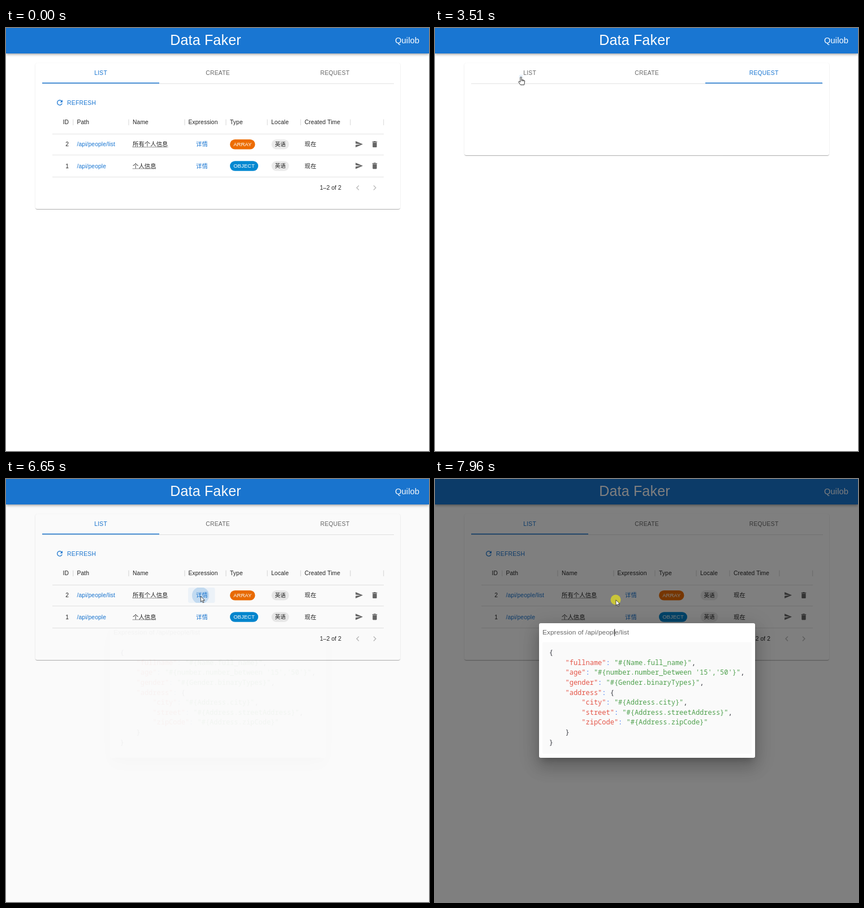
Recreate the animation shown at these times as an HTML page. Size 748 px wide and 748 px high, loop 8000 ms.

```html
<!DOCTYPE html>
<html lang="zh-CN">
<head>
<meta charset="utf-8">
<title>Data Faker</title>
<style>
html, body { margin: 0; width: 100%; height: 100%; overflow: hidden; background: #fff; }
div, body > svg { position: absolute; }
body > svg { left: 0; top: 0; width: 748px; height: 748px; }
svg { overflow: hidden; }
text { font-family: "Liberation Sans", "Noto Sans CJK SC", "Noto Sans CJK", sans-serif; white-space: pre; }
.code text { font: 12px "Noto Sans Mono", monospace; }
#head { left: 0; top: 0; width: 748px; height: 45px; background: #1976d2;
  box-shadow: 0 1.5px 3px -.7px #0003, 0 3px 3.7px #00000024, 0 .7px 7.4px #0000001f; }
#card { left: 52px; top: 62px; width: 645px; border-radius: 3px; background: #fff;
  box-shadow: 0 1.5px .7px -.7px #0003, 0 .7px .7px #00000024, 0 .7px 2.2px #0000001f; }
#shade { inset: 0; background: #00000080; }
#dialog { left: 183.5px; top: 255px; width: 382px; height: 237.5px; border-radius: 3px; background: #fff;
  box-shadow: 0 8px 11px -5px #0003, 0 17.6px 28px 2.2px #00000024, 0 6.6px 34px 6px #0000001f; }
#dialog svg { position: absolute; left: 0; top: 0; width: 100%; height: 100%; }
</style>
</head>
<body>
<div id="head"></div>
<div id="card"></div>
<svg id="page"></svg>
<div id="shade"></div>
<div id="dialog"></div>
<svg id="pointer"></svg>
<script>
const BLUE = '#1976d2', DARK = '#000000de', GREY = '#0009', RULE = '#e0e0e0';
const $ = id => document.getElementById(id);

// ---- drawing helpers ----
const text = (x, y, str, { size = 10.3, fill = DARK, gap = .11, anchor = 'start', id = '' } = {}) =>
  `<text ${id && `id="${id}"`} x="${x}" y="${y}" font-size="${size}" fill="${fill}" letter-spacing="${gap}" text-anchor="${anchor}">${str}</text>`;
const rect = (x, y, w, h, fill, r = 0, more = '') =>
  `<rect x="${x}" y="${y}" width="${w}" height="${h}" rx="${r}" fill="${fill}" ${more}/>`;
const hline = (x, y, w, fill) => rect(x, y, w, .9, fill);
const icon = (cx, cy, size, fill, d) =>
  `<path transform="translate(${cx - size / 2} ${cy - size / 2}) scale(${size / 24})" fill="${fill}" d="${d}"/>`;
const caret = (id, x, y, h) => rect(x, y, 1, h, '#222', 0, `id="${id}"`);

const ICON = {
  refresh: 'M17.65 6.35C16.2 4.9 14.21 4 12 4c-4.42 0-7.99 3.58-7.99 8s3.57 8 7.99 8c3.73 0 6.84-2.55 7.73-6h-2.08c-.82 2.33-3.04 4-5.65 4-3.31 0-6-2.69-6-6s2.69-6 6-6c1.66 0 3.14.69 4.22 1.78L13 11h7V4z',
  send: 'M2.01 21L23 12 2.01 3 2 10l15 2-15 2z',
  trash: 'M6 19c0 1.1.9 2 2 2h8c1.1 0 2-.9 2-2V7H6zM19 4h-3.5l-1-1h-5l-1 1H5v2h14z',
  prev: 'M15.41 7.41 14 6l-6 6 6 6 1.41-1.41L10.83 12z',
  next: 'M10 6 8.59 7.41 13.17 12l-4.58 4.59L10 18l6-6z',
  help: 'M11 18h2v-2h-2zm1-16C6.48 2 2 6.48 2 12s4.48 10 10 10 10-4.48 10-10S17.52 2 12 2zm0 18c-4.41 0-8-3.59-8-8s3.59-8 8-8 8 3.59 8 8-3.59 8-8 8zm0-14c-2.21 0-4 1.79-4 4h2c0-1.1.9-2 2-2s2 .9 2 2c0 2-3 1.75-3 5h2c0-2.25 3-2.5 3-5 0-2.21-1.79-4-4-4z',
  down: 'M7 10l5 5 5-5z',
  plus: 'M19 13h-6v6h-2v-6H5v-2h6V5h2v6h6z'
};

// ---- list panel ----
const row = (y, id, path, name, type, color, w) =>
  text(111, y + 3.7, id, { anchor: 'end' }) +
  text(125.5, y + 3.7, path, { fill: BLUE }) +
  text(224, y + 3.7, name) +
  `<path d="M224 ${y + 5}h${name.length * 10.4}" stroke="#444" stroke-width=".9" stroke-dasharray="1.8 1"/>` +
  text(336, y + 3.7, '详情', { fill: BLUE }) +
  rect(396, y - 8.6, w, 17.6, color, 8.8) +
  text(396 + w / 2, y + 3.6, type, { size: 9.56, fill: '#fff', gap: 0, anchor: 'middle' }) +
  rect(469.5, y - 8.6, 31, 17.6, '#ebebeb', 8.8) +
  text(485, y + 3.6, '英语', { size: 9.56, gap: 0, anchor: 'middle' }) +
  text(528, y + 3.7, '现在') +
  icon(624.3, y, 14.7, '#666', ICON.send) + icon(652, y, 14.7, '#666', ICON.trash);

const columns = [[125.5, 'Path'], [224, 'Name'], [322.5, 'Expression'], [396, 'Type'], [469, 'Locale'], [528, 'Created Time']];
const list =
  icon(95, 132, 14.7, BLUE, ICON.refresh) + text(108, 136, 'REFRESH', { fill: BLUE, gap: .29 }) +
  text(111, 170, 'ID', { anchor: 'end' }) + columns.map(([x, s]) => text(x, 170, s)).join('') +
  [118, 216.3, 315.3, 388.3, 461.5, 520.3, 608.3, 667].map(x => rect(x, 161.5, 1.3, 10.5, RULE)).join('') +
  rect(82, 188, 586, 36.5, '#0000000a', 0, 'id="rowHover"') +
  rect(322, 192, 47.5, 27, '#1976d20f', 3, 'id="linkHover"') +
  [187, 224.2, 263].map(y => hline(82, y, 586, RULE)).join('') +
  row(205.6, 2, '/api/people/list', '所有个人信息', 'ARRAY', '#ed6c02', 44.5) +
  row(243.8, 1, '/api/people', '个人信息', 'OBJECT', '#0288d1', 50) +
  text(555, 286.3, '1–2 of 2') + caret('pageCaret', 555, 277, 12) +
  icon(622, 282.5, 17.65, '#00000042', ICON.prev) + icon(652, 282.5, 17.65, '#00000042', ICON.next);

// ---- create panel ----
const label = (y, s) => text(87, y, s, { size: 11.77, fill: GREY });
const radio = (x, s, color, dot) =>
  `<circle cx="${x}" cy="491" r="6.6" fill="none" stroke="${color}" stroke-width="1.5"/>` +
  (dot ? `<circle cx="${x}" cy="491" r="3.7" fill="${color}"/>` : '') +
  text(x + 15.2, 495, s, { size: 11.77 });
const form =
  label(149, 'Path *') + hline(87, 156, 190, '#949494') +
  text(87, 169.5, 'pattern is /api/*', { size: 8.83, fill: GREY, gap: .29 }) +
  label(213, 'Name *') + hline(87, 220, 190, '#949494') +
  label(260, 'Intro') + hline(87, 267, 317, '#949494') +
  label(298, 'Expression *') + icon(168.4, 294.5, 17.65, '#5a5a5a', ICON.help) +
  rect(87, 315, 411, 126, '#fffffd') + hline(107, 315, 381, '#e8e8e8') + hline(107, 328, 381, '#e8e8e8') +
  `<g class="code" style="font-size:10.3px">${text(106.5, 326, '{', { gap: 0 })}${text(106.5, 354, '}', { gap: 0 })}</g>` +
  rect(488, 315, 10, 102.5, '#c0c0c0') + rect(488, 417, .9, 24, '#ddd') +
  label(471, 'Type') + radio(95, 'Object', BLUE, true) + radio(163.7, 'Array', '#666') +
  text(87, 527, 'locale', { size: 8.83, fill: GREY }) + text(87, 545.5, '中文简体', { size: 11.77 }) +
  icon(173.5, 542, 17.65, '#666', ICON.down) + hline(87, 553, 95, '#949494') +
  rect(87, 571.5, 84, 26.5, BLUE, 3, 'style="filter:drop-shadow(0 1.2px 1.2px #0006)"') +
  text(99, 588, 'CREATE', { fill: '#fff', gap: .29 }) + icon(155, 584.8, 14.7, '#fff', ICON.plus);

// ---- ripples: press, release, centre, radius, clip box ----
const ripples = [
  [2170, 2300, 395, 86, 127, [271, 63, 207, 35]],
  [2800, 2880, 575, 84, 112, [478, 63, 207, 35]],
  [3370, 3515, 152, 86, 122, [64, 63, 207, 35]],
  [6460, 6600, 344, 206, 30, [322, 192, 47.5, 27]]
];
const rippleMarkup = ripples.map(([, , cx, cy, , [x, y, w, h]], i) =>
  `<svg x="${x}" y="${y}" width="${w}" height="${h}"><circle id="ripple${i}" cx="${cx - x}" cy="${cy - y}" fill="${BLUE}"/></svg>`).join('');

const tabs = ['LIST', 'CREATE', 'REQUEST'];
$('page').innerHTML =
  text(353, 29.7, 'Data Faker', { size: 25, fill: '#fff', gap: .18, anchor: 'middle' }) +
  text(688, 27, 'Quilob', { size: 14.7, fill: '#fff' }) +
  hline(64, 98, 622, RULE) +
  tabs.map((s, i) => text(167.6 + 207 * i, 83.2, s, { gap: .29, anchor: 'middle', id: 'tab' + i })).join('') +
  rect(64, 96.6, 207, 1.5, BLUE, 0, 'id="bar"') +
  `<g id="panel0">${list}</g><g id="panel1">${form}</g>` + rippleMarkup;

// ---- dialog ----
const source = `{
    "fullname": "#{Name.full_name}",
    "age": "#{number.number_between '15','50'}",
    "gender": "#{Gender.binaryTypes}",
    "address": {
        "city": "#{Address.city}",
        "street": "#{Address.streetAddress}",
        "zipCode": "#{Address.zipCode}"
    }
}`;
const paint = (color, s) => `<tspan fill="${color}">${s}</tspan>`;
const highlight = line => line.replace(/("\w+")(:)|"[^"]+"/g, (all, key, colon) =>
  key ? paint('#e45649', key) + paint('#4078f2', colon) : paint('#50a14f', all));
$('dialog').innerHTML = '<svg>' +
  text(6, 20, 'Expression of /api/people/list', { size: 11.77, fill: GREY }) +
  caret('titleCaret', 133.2, 10, 13) + rect(6, 33.5, 370, 197.5, '#fafafa', 2) + '<g class="code">' +
  source.split('\n').map((s, i) => text(17.7, 56.2 + 17.6 * i, highlight(s), { fill: '#383a42', gap: 0 })).join('') +
  '</g></svg>';

$('pointer').innerHTML =
  `<g id="cursor"><circle id="press" r="9" fill="#d2cd32" fill-opacity=".9"/>
  <path id="arrow" fill="#fff" stroke="#222" stroke-width=".8" d="M.4.4V10.2L2.7 8.1 4.3 11.8 5.9 11.1 4.3 7.5H7.4Z"/>
  <path id="hand" fill="#fff" stroke="#222" stroke-width=".9" stroke-linejoin="round"
    d="M-1.2 1.4Q0-.5 1.2 1.4V5.4L5.5 6.4Q6.8 6.8 6.7 8.4L5.6 14.6H-.8L-4 10Q-4.3 8.2-2.7 8.4L-1.2 9.6ZM1.2 5.4V8M3.2 6V8.2M5 6.4V8.4"/></g>`;

// ---- motion ----
const LOOP = 8000, FRAME = 100.8;
const clamp = v => Math.min(1, Math.max(0, v));
const mix = (a, b, p) => a + (b - a) * p;

// cubic-bezier(.4, 0, .2, 1)
function ease(x) {
  x = clamp(x);
  let lo = 0, hi = 1, s = .5;
  for (let i = 0; i < 20; i++) {
    s = (lo + hi) / 2;
    const q = 1 - s;
    if (1.2 * q * q * s + .6 * q * s * s + s * s * s < x) lo = s; else hi = s;
  }
  return 3 * s * s - 2 * s * s * s;
}

const path = [
  [790, 26, 361], [1100, 180, 200], [1310, 378, 47], [1600, 402, 76], [2170, 395, 86], [2330, 395, 86],
  [2520, 488, 79.5], [2800, 575, 84], [2900, 575, 84], [3340, 152, 86], [3600, 152, 86], [4133, 330, 162],
  [4234, 342, 180], [4536, 351, 205], [4740, 351, 205], [5040, 484, 203], [5145, 484, 203], [5500, 579, 201],
  [5947, 402, 203], [6350, 344, 207], [7060, 344, 207], [7963, 319.5, 213.5]
];
function pointAt(t) {
  const i = path.findIndex(p => p[0] > t);
  if (i < 0) return path.at(-1).slice(1);
  const a = path[Math.max(0, i - 1)], b = path[i], p = clamp((t - a[0]) / (b[0] - a[0] || 1));
  return [mix(a[1], b[1], p), mix(a[2], b[2], p)];
}

const switches = [[0, 0], [2319, 1], [2880, 2], [3515, 0]];
const cardHeight = [258, 553, 163];
const OPEN = 6625;

const show = (id, on) => $(id).style.display = on ? '' : 'none';
const set = (id, attrs) => { for (const k in attrs) $(id).setAttribute(k, attrs[k]); };

function draw(now) {
  const step = Math.floor((now % LOOP + 17) / 100.9), t = step * FRAME;

  let tab = 0, bar = 64;
  for (const [at, n] of switches) if (t >= at) {
    tab = n;
    bar = mix(bar, 64 + 207 * n, ease((t - at) / 300));
  }
  set('bar', { x: bar });
  tabs.forEach((_, i) => set('tab' + i, { fill: i === tab ? BLUE : GREY }));
  show('panel0', tab === 0);
  show('panel1', tab === 1);
  $('card').style.height = cardHeight[tab] + 'px';

  ripples.forEach(([down, up, , , r], i) => {
    const p = ease((t - down) / 550);
    set('ripple' + i, { r: t > down ? r * p : 0, opacity: (.1 + .2 * p) * (1 - ease((t - up) / 550)) });
  });

  const [x, y] = pointAt(t), free = t < OPEN;
  const onTab = y > 63 && y < 98 && x > 64 && x < 685;
  const onLink = x > 322 && x < 369.5 && y > 192 && y < 219;
  const hand = free && (onTab || onLink);
  set('cursor', { transform: `translate(${x} ${y})` });
  show('cursor', step >= 8);
  show('hand', hand);
  show('arrow', !hand);
  show('press', step >= 79);
  show('rowHover', free && t > 4200 && y > 188);
  set('linkHover', { opacity: onLink ? 1 - ease((t - OPEN) / 250) : 0 });

  const open = ease((t - OPEN) / 225);
  $('shade').style.opacity = $('dialog').style.opacity = open;
  show('pageCaret', step === 1 || step === 2);
  show('titleCaret', step >= 79);
}

const start = performance.now();
function tick() {
  draw(performance.now() - start);
  requestAnimationFrame(tick);
}
tick();
</script>
</body>
</html>
```
